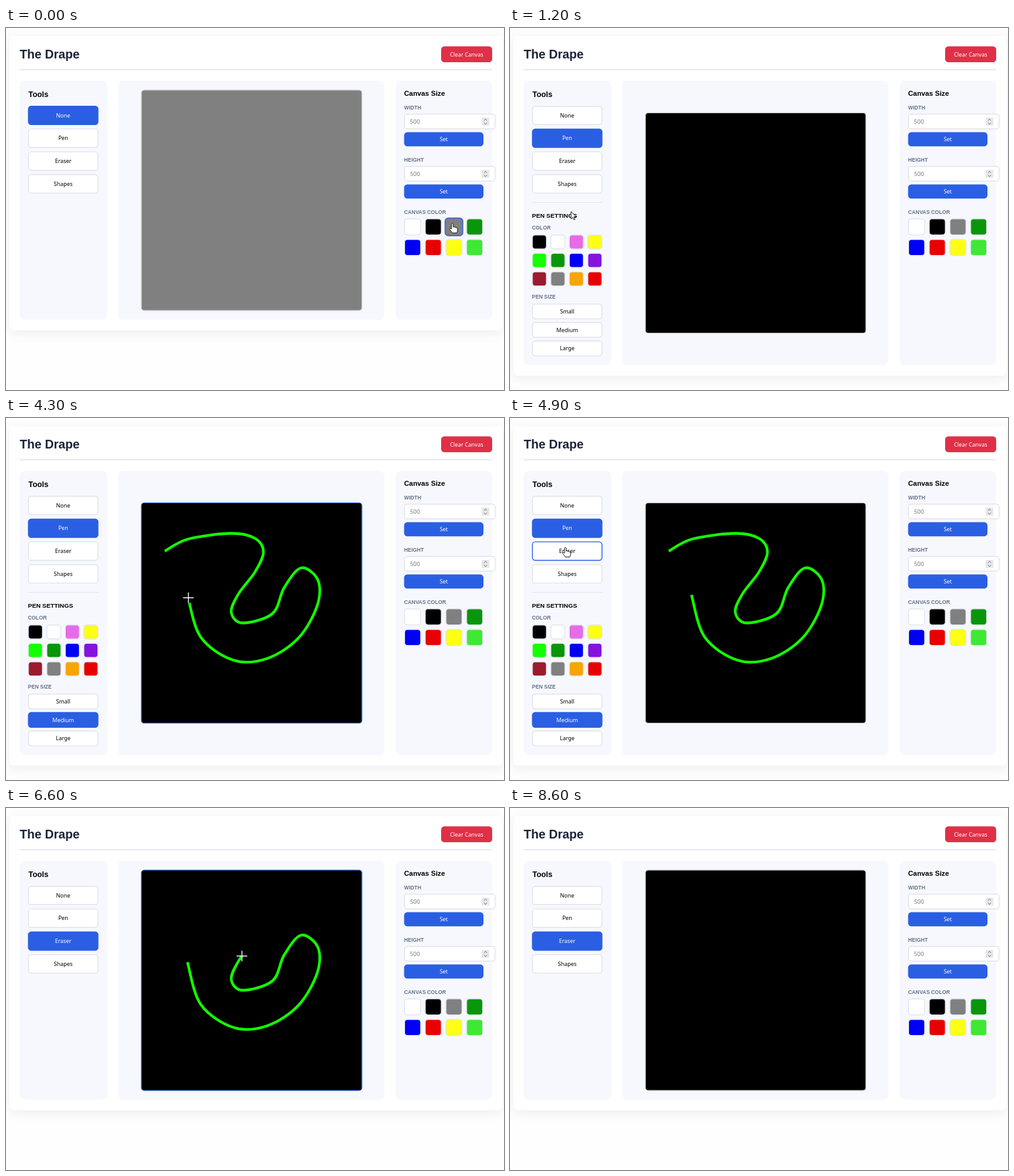
An HTML page for the animation above (8.7 s loop, 800 by 582 pixels).

```html
<!DOCTYPE html>
<html lang="en">
<head>
<meta charset="utf-8">
<title>Drawing board</title>
<style>
  html, body { margin: 0; width: 100%; height: 100%; overflow: hidden; background: #fefefe; }
  svg { display: block; }
  text { font: 500 8.9px "Noto Sans", "Open Sans", sans-serif; fill: #000; }
  .head { font-family: "Liberation Sans", Arial, sans-serif; font-weight: 700; }
  .label { font: 700 8.4px "Liberation Sans", Arial, sans-serif; fill: #64748b; }
  .card { fill: #fff; filter: drop-shadow(0 4px 9px rgba(0, 0, 0, .07)); }
  .panel { fill: #f7f8fd; }
  .mid { text-anchor: middle; }
</style>
</head>
<body>
<svg id="stage" width="800" height="582" viewBox="0 0 800 582"></svg>
<script>
const LOOP = 8700, STEP = 100;
const BLUE = '#2a5fe3', EDGE = '#e0e4ee';
const PEN_ON = 1000, SIZE_ON = 2000, ERASER_ON = 5000, CLEAR = 8200;
const DRAW = [2550, 4320], ERASE = [5750, 6900];
const TALL = 73, SHIFT = TALL / 2;
const LEFT = 35.3, RIGHT = 639.5, ROW = 36.7;
const stage = document.getElementById('stage');

function set(el, attrs) {
  for (const key in attrs) el.setAttribute(key, attrs[key]);
}
function add(tag, attrs, parent = stage) {
  const el = document.createElementNS('http://www.w3.org/2000/svg', tag);
  set(el, attrs);
  return parent.appendChild(el);
}
function rect(x, y, width, height, rx, attrs, parent) {
  return add('rect', { x, y, width, height, rx, ...attrs }, parent);
}
function text(str, x, y, attrs, parent) {
  const el = add('text', { x, y, ...attrs }, parent);
  el.textContent = str;
  return el;
}
function heading(str, x, y, size, parent, color = '#000') {
  text(str, x, y, { class: 'head', style: `font-size:${size}px;fill:${color}` }, parent);
}
function label(str, x, y, parent) {
  text(str, x, y, { class: 'label' }, parent);
}

// Clickable things repaint themselves for hover and active states.
const targets = [];
function register(item) {
  targets.push(item);
  return item;
}
function button(str, x, y, w, h, parent, fill) {
  const box = rect(x + .7, y + .7, w - 1.4, h - 1.4, 4.5, { 'stroke-width': 1.4 }, parent);
  const caption = text(str, x + w / 2, y + h / 2 + 3.2, { class: 'mid' }, parent);
  return register({
    x: x + w / 2, y: y + h / 2, w, h, parent,
    paint(hover) {
      const solid = fill || (this.active && BLUE);
      set(box, { fill: solid || '#fff', stroke: solid || (hover ? BLUE : EDGE) });
      caption.style.fill = solid ? '#fff' : '';
    }
  });
}
function swatch(color, x, y, size, parent) {
  const g = add('g', {}, parent), inner = size - 1.4;
  const box = rect(-inner / 2, -inner / 2, inner, inner, 4.5, { fill: color, 'stroke-width': 1.4 }, g);
  return register({
    x, y, w: size, h: size, parent,
    paint(hover) {
      set(g, { transform: `translate(${x} ${y}) scale(${hover ? 1.1 : 1})` });
      set(box, { stroke: hover ? BLUE : EDGE });
    }
  });
}
function palette(colors, x, y, gap, size, parent) {
  return colors.split(' ').map((c, i) => swatch(c, x + i % 4 * gap, y + (i >> 2) * gap, size, parent));
}

const card = rect(5, 13, 793, 473, 8, { class: 'card' });
heading('The Drape', 22, 49.3, 19.7, stage, '#1a2338');
const clearButton = button('Clear Canvas', 699, 29.6, 82, 25.5, stage, '#e03047');
rect(22, 66.3, 759, 1.5, 0, { fill: '#e0e3ea' });
const panels = [[22, 140.5], [180, 428], [626, 155]].map(([x, w]) => rect(x, 85, w, 384, 8, { class: 'panel' }));

heading('Tools', 36, 110.8, 12.4);
const tools = ['None', 'Pen', 'Eraser', 'Shapes'].map((name, i) => button(name, LEFT, 125 + i * ROW, 113.2, 31));

const penPanel = add('g', {});
rect(36, 280, 112, 1, 0, { fill: EDGE }, penPanel);
heading('PEN SETTINGS', LEFT, 305, 9.9, penPanel);
label('COLOR', LEFT, 324.2, penPanel);
const inks = palette('#000 #fff #e66be8 #ffff14 #14ff00 #0a960a #0000f4 #8614dc #9b1c2e #808080 #f7a500 #e80000',
  47.2, 344, 29.7, 24, penPanel);
label('PEN SIZE', LEFT, 435, penPanel);
const sizes = ['Small', 'Medium', 'Large'].map((name, i) => button(name, LEFT, 443 + i * 29.8, 113.2, 25.2, penPanel));

heading('Canvas Size', RIGHT, 109, 11.25);
['WIDTH', 'HEIGHT'].forEach((name, i) => {
  const y = i * 84;
  label(name, RIGHT, 131.3 + y);
  rect(640.2, 138.5 + y, 145.5, 23.8, 4, { fill: '#fff', stroke: EDGE, 'stroke-width': 1.4 });
  text('500', 649, 153.8 + y, { style: 'fill:#777;font-weight:400;font-size:9.3px' });
  rect(764, 144 + y, 12.5, 13, 1, { fill: '#e8e8ec' });
  add('path', { d: `M767.7 ${148.8 + y}l2.5 -2.4 2.5 2.4m-5 3.6l2.5 2.4 2.5 -2.4`, fill: 'none', stroke: '#666' });
  button('Set', RIGHT, 167.4 + y, 127.5, 22.8, stage, BLUE);
});
label('CANVAS COLOR', RIGHT, 299.3);
const papers = palette('#fff #000 #808080 #0a960a #0000f4 #e80000 #ffff14 #3fe835', 653.2, 319.7, 33.2, 27.2);

// Drawing surface and the pen stroke.
const PAPER = { x: 394.6, y: 277, size: 354.3 };
const board = add('g', {});
const paper = rect(PAPER.x - PAPER.size / 2, PAPER.y - PAPER.size / 2, PAPER.size, PAPER.size, 4.5, { 'stroke-width': 1.4 }, board);
const points = [
  [255, 177.5], [293, 158], [362, 149], [400, 157], [413.5, 179], [400, 211], [373, 247], [362, 276], [380, 293],
  [428, 278], [447, 236], [474, 204.5], [501, 224], [500, 265], [470, 317], [420, 350], [366, 353], [313, 316], [291.5, 248]
];
function smoothPath(p) {
  let d = `M${p[0]}`;
  for (let i = 0; i < p.length - 1; i++) {
    const b = p[i], c = p[i + 1], a = p[i - 1] || b, e = p[i + 2] || c;
    d += `C${b.map((v, k) => v + (c[k] - a[k]) / 6)} ${c.map((v, k) => v - (e[k] - b[k]) / 6)} ${c}`;
  }
  return d;
}
const stroke = add('path', { d: smoothPath(points.slice(0, 9)), fill: 'none', stroke: '#14ff00', 'stroke-width': 4.3 }, board);
const eraseLength = stroke.getTotalLength();
set(stroke, { d: smoothPath(points) });
const total = stroke.getTotalLength();

const outline = { fill: '#fff', stroke: '#000', 'stroke-width': .9 };
const cursors = {
  arrow: add('path', { d: 'M0 0V12L2.8 9.4 4.6 13.4 6.5 12.6 4.7 8.7H8.4Z', ...outline }),
  hand: add('path', {
    d: 'M-1.3 1Q0 -1.4 1.3 1V6Q3 4.8 4 6.4Q5.6 5.6 6.4 7.2Q8.4 6.6 8.4 9V11Q8.4 13 7 15.5H0L-4.4 9.6Q-4.6 7 -1.3 9Z',
    ...outline
  }),
  cross: add('path', { d: 'M-8.5 0H8.5M0 -8.5V8.5', 'stroke-width': 1.4 })
};

const smooth = u => u * u * (3 - 2 * u);
const steady = u => (u + smooth(u)) / 2;
const phase = (t, [from, to]) => Math.max(0, Math.min(1, (t - from) / (to - from)));

// The pointer reaches each stop, rests there until the second time, then moves on.
const on = item => ({ x: item.x - 2.5, y: item.y - 6 });
const onStroke = (length, dy) => {
  const p = stroke.getPointAtLength(length);
  return { x: p.x, y: p.y + dy };
};
const stops = [
  [0, 200, on(papers[2])],
  [400, 600, on(papers[1])],
  [900, PEN_ON, on(tools[1])],
  [1200, 1200, { x: 97.5, y: 295 }],
  [1500, 1600, on(inks[4])],
  [1900, 2100, on(sizes[1])],
  [2500, DRAW[0], onStroke(0, SHIFT)],
  [DRAW[1], 4500, onStroke(total, SHIFT)],
  [4900, 5150, on(tools[2])],
  [5600, 5600, { x: 246, y: 180 }],
  [...ERASE.slice(0, 1), ERASE[0], onStroke(0, 0)],
  [ERASE[1], 7050, onStroke(eraseLength, 0)],
  [7500, 7500, { x: 582, y: 100 }],
  [7900, LOOP, on(clearButton)]
];
function pointer(t, drawn, erased) {
  if (t > DRAW[0] && t < DRAW[1]) return onStroke(drawn, SHIFT);
  if (t > ERASE[0] && t < ERASE[1]) return onStroke(erased, 0);
  const i = stops.findIndex(([, leave]) => leave >= t);
  const [arrive, , to] = stops[i];
  if (t >= arrive) return to;
  const [, leave, from] = stops[i - 1];
  const u = smooth(phase(t, [leave, arrive]));
  return { x: from.x + (to.x - from.x) * u, y: from.y + (to.y - from.y) * u };
}

function render(t) {
  const penMode = t >= PEN_ON && t < ERASER_ON;
  const tool = t < PEN_ON ? 0 : penMode ? 1 : 2;
  const extra = penMode ? TALL : 0, shift = extra / 2;
  set(card, { height: 473 + extra });
  panels.forEach(p => set(p, { height: 384 + extra }));
  penPanel.style.display = penMode ? '' : 'none';
  set(board, { transform: `translate(0 ${shift})` });

  const drawn = total * steady(phase(t, DRAW));
  const erased = eraseLength * steady(phase(t, ERASE));
  const inked = t < DRAW[1] ? Math.max(0, drawn - 9) : total;
  set(stroke, { 'stroke-dasharray': `0 ${erased} ${Math.max(0, inked - erased)} ${total * 2}` });
  stroke.style.display = inked > 0 && t < CLEAR ? '' : 'none';

  const { x, y } = pointer(t, drawn, erased);
  const visible = t <= CLEAR;
  const inside = (cx, cy, w, h = w) => visible && Math.abs(x - cx) < w / 2 && Math.abs(y - cy) < h / 2;
  const onPaper = inside(PAPER.x, PAPER.y + shift, PAPER.size);
  const nearPaper = inside(PAPER.x, PAPER.y + shift, PAPER.size + 24);
  set(paper, { fill: t < 500 ? '#808080' : '#000', stroke: nearPaper ? '#3b70e0' : '#cfcfcf' });

  tools.forEach((item, i) => item.active = i === tool);
  sizes[1].active = t >= SIZE_ON;
  let overTarget = false;
  for (const item of targets) {
    const hover = (item.parent !== penPanel || penMode) && inside(item.x, item.y, item.w, item.h);
    overTarget ||= hover;
    item.paint(hover);
  }

  const kind = overTarget ? 'hand' : nearPaper && tool ? 'cross' : 'arrow';
  for (const name in cursors) {
    cursors[name].style.display = visible && name === kind ? '' : 'none';
    set(cursors[name], { transform: `translate(${Math.round(x)} ${Math.round(y)})` });
  }
  set(cursors.cross, { stroke: onPaper ? '#fff' : '#000' });
}

const start = performance.now();
function tick() {
  const t = (performance.now() - start) % LOOP;
  render(Math.floor(t / STEP) * STEP);
  requestAnimationFrame(tick);
}
tick();
</script>
</body>
</html>
```
